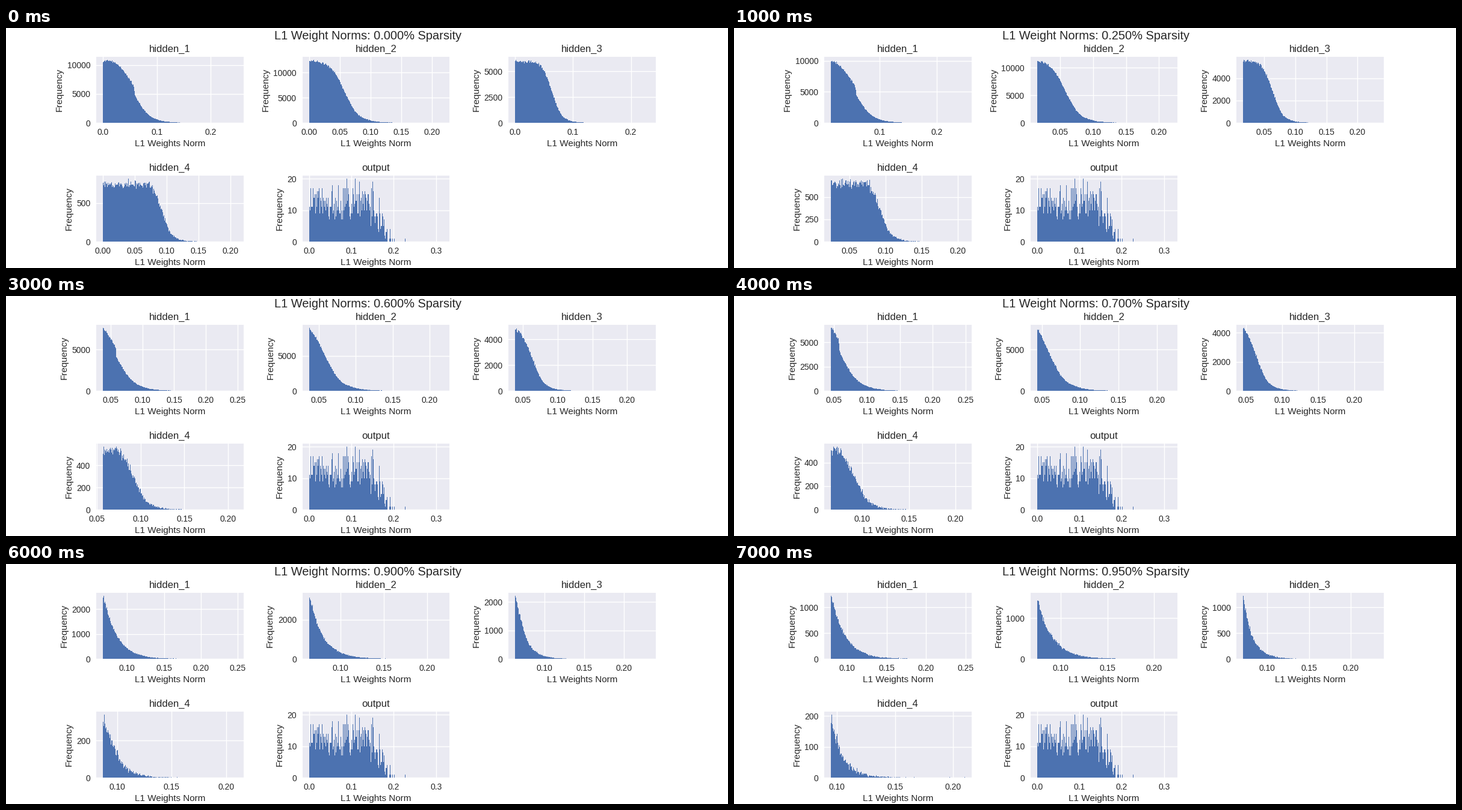
These frames come from a looping animation (1200x400 px, 8 s). A matplotlib script:

```python
import numpy as np
import matplotlib.pyplot as plt
from matplotlib.animation import FuncAnimation

BINS = 300
BLUE = "#4C72B0"
SPARSITY = [0, .25, .5, .6, .7, .8, .9, .95]
OUTPUT_MAX = 21

plt.rcParams.update({
    "font.family": "Liberation Sans",
    "text.color": ".15", "axes.labelcolor": ".15",
    "xtick.color": ".15", "ytick.color": ".15",
    "axes.facecolor": "#EAEAF2", "axes.edgecolor": "white",
    "axes.linewidth": 0, "axes.axisbelow": True, "axes.grid": True,
    "grid.color": "white", "grid.linestyle": "-", "grid.linewidth": 1,
    "axes.labelsize": 11, "axes.titlesize": 12,
    "xtick.labelsize": 10, "ytick.labelsize": 10,
    "xtick.major.size": 0, "ytick.major.size": 0,
    "xtick.major.pad": 6.4, "ytick.major.pad": 7,
})


def sample(size, hi, mid, width, corner=0, tail=.78, cut=0, step=0):
    """Sorted weight norms with a flat top that rolls off around mid.

    corner sharpens the shoulder, tail below 1 slows the final decay, and
    the density drops abruptly at cut by an amount set by step.
    """
    x = np.linspace(0, hi, 6000)
    u = (x - mid) / width
    slope = np.minimum(u, tail * u + 2 * (1 - tail))
    slope -= corner * np.minimum(u + 1, 0) ** 2
    slope -= step * (x < cut)
    cdf = np.cumsum(1 / (1 + np.exp(slope)))
    cdf = (cdf - cdf[0]) / (cdf[-1] - cdf[0])
    weights = np.sort(np.interp(rng.random(size), cdf, x))
    weights[-1] = hi
    return weights


def make_panel(slot, name):
    ax = fig.add_subplot(2, 3, slot)
    ax.set_title(name)
    ax.set_xlabel("L1 Weights Norm")
    ax.set_ylabel("Frequency")
    bars = ax.bar(np.zeros(BINS), np.zeros(BINS), align="edge",
                  color=BLUE, linewidth=0)
    return ax, bars


def set_hist(ax, bars, counts, edges):
    width = edges[1] - edges[0]
    for bar, n, x in zip(bars, counts, edges):
        bar.set(x=x, width=width, height=n)
    lo, hi = edges[0], edges[-1]
    margin = .05 * (hi - lo)
    ax.set_xlim(lo - margin, hi + margin)
    ax.set_ylim(0, 1.05 * counts.max())


rng = np.random.default_rng(7)
fig = plt.figure(figsize=(12, 4), dpi=100, facecolor="white")
fig.subplots_adjust(left=.125, right=.9, bottom=.11, top=.88,
                    wspace=.4, hspace=.8)
title = fig.suptitle("", x=.501, y=.99, fontsize=14.4)

hidden = [
    sample(784000, .2487, .0562, .0152, corner=.6, tail=.93,
           cut=.0585, step=.42),
    sample(1000000, .2181, .0579, .01176),
    sample(500000, .2316, .0639, .00852, corner=.15),
    sample(100000, .2099, .0934, .00745, corner=.7),
]

panels = []
for slot, weights in enumerate(hidden, 1):
    hists = [np.histogram(weights[int(s * len(weights)):], BINS)
             for s in SPARSITY]
    panels.append((*make_panel(slot, f"hidden_{slot}"), hists))

# The output layer is never pruned
counts, edges = np.histogram(
    sample(2000, .3163, .168, .009, corner=.5, tail=1), BINS)
counts = np.minimum(counts, OUTPUT_MAX)
set_hist(*make_panel(5, "output"), counts, edges)


def update(i):
    title.set_text(f"L1 Weight Norms: {SPARSITY[i]:.3f}% Sparsity")
    for ax, bars, hists in panels:
        set_hist(ax, bars, *hists[i])


anim = FuncAnimation(fig, update, frames=len(SPARSITY), interval=1000,
                     repeat=True, repeat_delay=0)
plt.show()
```
